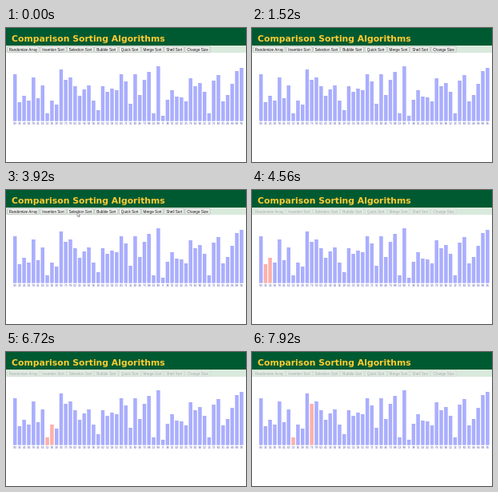
These frames come from a looping animation (300 by 168 pixels, 8 s). An HTML page:

```html
<!DOCTYPE html>
<html lang="en">
<head>
<meta charset="utf-8">
<title>Comparison Sorting Algorithms</title>
<style>
  html, body { margin: 0; width: 100%; height: 100%; overflow: hidden; background: #fff; }
  svg { display: block; width: 100vw; height: 100vh; }
  .title { font: bold 10.84px "DejaVu Sans", sans-serif; fill: #fc3; }
  .btn text { font: 4.65px "Liberation Sans", Arial, sans-serif; text-anchor: middle; fill: #111; }
  .btn rect { fill: #f1f2f1; stroke: #858b87; stroke-width: .4; }
  .off .btn text { fill: #a3aaa5; }
  .off .btn rect { fill: #e3ece5; stroke: #c3cec6; }
  .label { font: 3px "Liberation Sans", Arial, sans-serif; text-anchor: middle; fill: #3c3ca0; }
  .bar { fill: #aaaeff; stroke: #9297f2; stroke-width: .4; }
  .bar.hot { fill: #ffb0aa; stroke: #f29b95; }
</style>
</head>
<body>
<svg id="stage" viewBox="0 0 300 168" preserveAspectRatio="none">
  <rect width="300" height="168" fill="#fff"/>
  <rect width="300" height="22" fill="#005a31"/>
  <rect y="22" width="300" height="9" fill="#d9eadc"/>
  <text class="title" x="7" y="16.6">Comparison Sorting Algorithms</text>
  <g id="nav"></g>
  <g id="chart"></g>
  <path id="pointer" d="M89 28.2v5l1.2-1.1.9 1.9.9-.4-.9-1.8h1.6z" fill="#fff" stroke="#222" stroke-width=".4"/>
</svg>
<script>
const LOOP = 8000, BASE = 116.4, PITCH = 5.78, LEFT = 9;
const tops = [
  58, 93, 85, 91, 62, 88, 72, 107, 91, 96, 52, 65, 62, 73, 85, 77, 72,
  91, 103, 73, 80, 76, 78, 58, 67, 95, 58, 84, 65, 55, 107, 48, 110,
  90, 78, 86, 87, 92, 63, 73, 69, 80, 107, 66, 59, 92, 84, 70, 54, 50
];
const buttons = [
  ["Randomize Array", 2, 41], ["Insertion Sort", 43, 75],
  ["Selection Sort", 76.6, 109.2], ["Bubble Sort", 111, 139.6],
  ["Quick Sort", 141.4, 168], ["Merge Sort", 169.8, 196.4],
  ["Shell Sort", 198, 222.4], ["Change Size", 224, 255]
];
// Start of each comparison, the first one being item 1
const steps = [4080, 4480, 4720, 5040, 5440, 5760, 6160, 6480, 6880, 7200, 7520];

const $ = id => document.getElementById(id);
function add(parent, tag, attrs, text) {
  const el = document.createElementNS("http://www.w3.org/2000/svg", tag);
  for (const key in attrs) el.setAttribute(key, attrs[key]);
  if (text !== undefined) el.textContent = text;
  parent.appendChild(el);
  return el;
}

for (const [name, x0, x1] of buttons) {
  const g = add($("nav"), "g", { class: "btn" });
  add(g, "rect", { x: x0, y: 23.2, width: x1 - x0, height: 7.2, rx: .7 });
  add(g, "text", { x: (x0 + x1) / 2, y: 28.5 }, name);
}

const bars = tops.map((top, i) => {
  const x = LEFT + i * PITCH;
  add($("chart"), "text", { class: "label", x: x + 2.1, y: 120.6 }, Math.round((BASE - top) / .7));
  return add($("chart"), "rect", { class: "bar", x: x + .2, y: top + .2, width: 3.9, height: BASE - top - .2 });
});

function draw(t) {
  const item = steps.filter(s => s <= t).length;
  let min = 0;
  for (let i = 1; i < item; i++) if (tops[i] > tops[min]) min = i;
  bars.forEach((bar, i) => {
    bar.classList.toggle("hot", item > 0 && (i === min || i === item));
  });
  $("nav").setAttribute("class", item ? "off" : "");
  $("pointer").style.display = t >= 3680 && t < 4320 ? "" : "none";
}

const start = performance.now();
function tick() {
  draw((performance.now() - start) % LOOP);
  requestAnimationFrame(tick);
}
tick();
</script>
</body>
</html>
```
